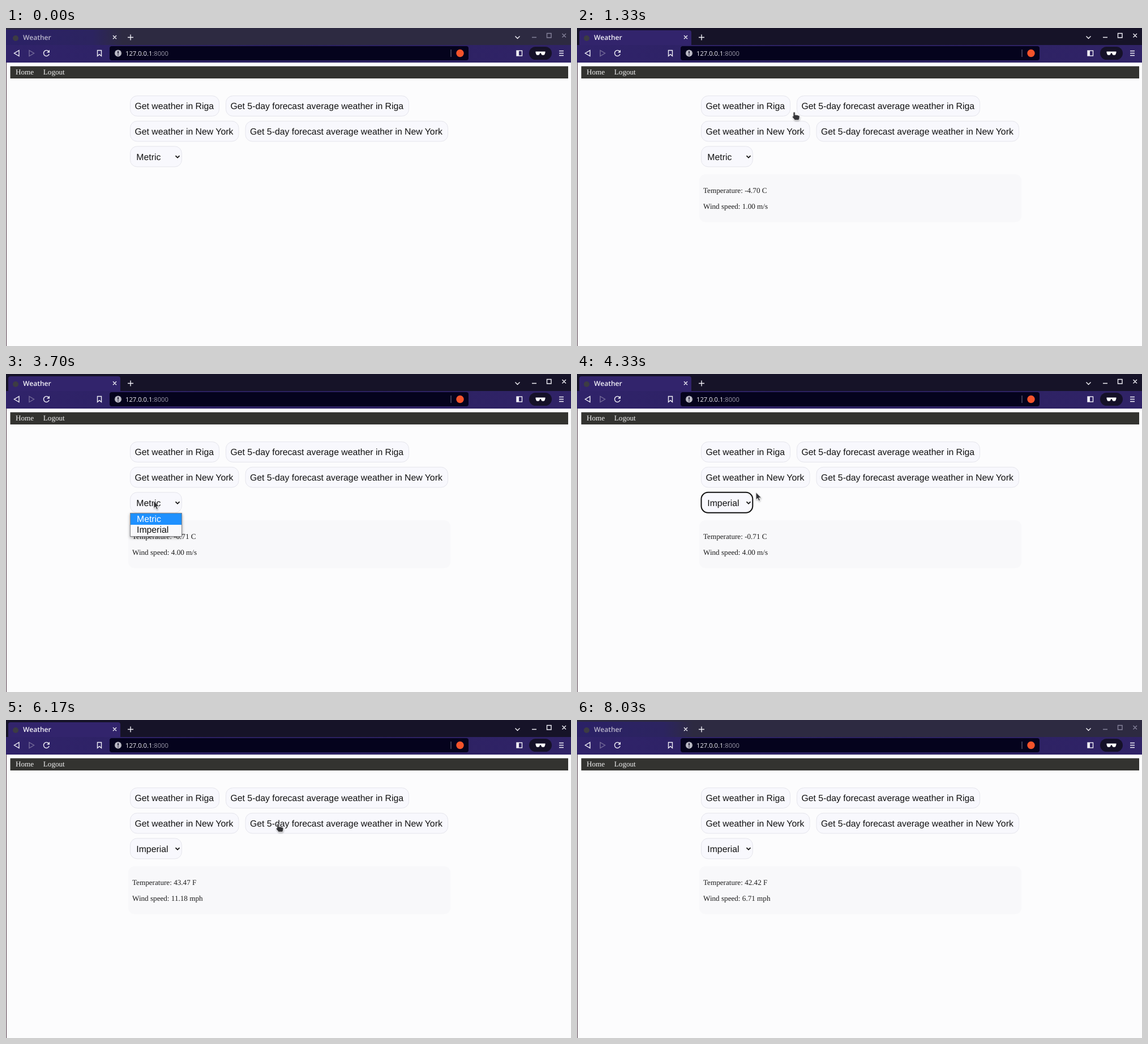
These frames come from a looping animation (998 by 561 pixels, 8.06 s). An HTML page:

```html
<!DOCTYPE html>
<html lang="en">
<head>
<meta charset="utf-8">
<title>Weather</title>
<style>
html, body { margin: 0; width: 100%; height: 100%; overflow: hidden; background: #fcfcfd; }
svg { display: block; width: 998px; height: 561px; }
text { text-rendering: geometricPrecision; white-space: pre; }
.ui { font: 15.8px "Liberation Sans", Arial, sans-serif; fill: #111; }
.page { font: 13.15px "Liberation Serif", "Times New Roman", serif; fill: #1c1c1c; }
.nav { fill: #f2f2f2; }
.tab { font: 600 12.1px "Open Sans", "Noto Sans", sans-serif; }
.url { font: 11.2px "Open Sans", "Noto Sans", sans-serif; fill: #f1f0f6; }
.box { fill: #f8f8fd; stroke: #e5e5ec; }
.line { fill: none; stroke: #f0eff6; stroke-width: 1.4; }
</style>
</head>
<body>
<svg viewBox="0 0 998 561">
  <defs>
    <linearGradient id="idleTab">
      <stop offset="0" stop-color="#2b2166"/><stop offset=".75" stop-color="#2c2460"/><stop offset="1" stop-color="#2d2a42"/>
    </linearGradient>
    <linearGradient id="bar">
      <stop offset="0" stop-color="#30236a"/><stop offset=".5" stop-color="#2b2160"/><stop offset="1" stop-color="#302367"/>
    </linearGradient>
    <filter id="shade" x="-20%" y="-20%" width="140%" height="160%">
      <feDropShadow dx="0" dy="2" stdDeviation="2.5" flood-opacity=".35"/>
    </filter>
    <filter id="soft" x="-50%" y="-50%" width="200%" height="200%">
      <feDropShadow dx="0.5" dy="1.5" stdDeviation="1" flood-opacity=".3"/>
    </filter>
  </defs>

  <rect width="998" height="561" fill="#fcfcfd"/>
  <rect y="61" width="1" height="500" fill="#513b48"/>

  <!-- tab strip, window without focus -->
  <rect width="998" height="31" fill="#2d2a41"/>
  <rect y="3" width="204" height="28" fill="url(#idleTab)"/>
  <text class="tab" x="30" y="20.5" fill="#bab6cb">Weather</text>
  <g class="line" style="stroke:#85829a">
    <path d="M929 16.5h8M955.5 9.500h7.500v7.500h-7.500zM982.500 10l6.500 6.500m0-6.500l-6.500 6.500"/>
  </g>

  <!-- tab strip, window with focus -->
  <g id="active">
    <rect width="998" height="31" fill="#161328"/>
    <path d="M4 31V8q0-4 4-4H198q4 0 4 4V31z" fill="#32246c"/>
    <text class="tab" x="30" y="20.5" fill="#f3f2f8">Weather</text>
    <path class="line" d="M929 16.500h8M955.500 9.500h7.500v7.500h-7.500zM982.500 10l6.500 6.500m0-6.500l-6.500 6.500"/>
  </g>
  <circle cx="17" cy="18" r="5" fill="#3d3c43"/>
  <path class="line" d="M189 13.300l6 6m0-6l-6 6M215 16.500h10M220 11.500v10M899.500 14.500l4 4 4-4"/>

  <!-- toolbar -->
  <rect y="30" width="998" height="31" fill="url(#bar)"/>
  <path class="line" d="M23 39.500v10l-8.500-5z"/>
  <path class="line" d="M41 39.500v10l8.500-5z" style="stroke:#746b98"/>
  <path class="line" d="M75.300 41.200A5 5 0 1 0 76.200 46"/>
  <path d="M77 38.500v5h-5z" fill="#f0eff6"/>
  <path class="line" d="M161.500 39.500h7v10l-3.500-3-3.500 3z"/>
  <rect x="183" y="32" width="634" height="25" rx="4" fill="#05031d"/>
  <circle cx="198" cy="44.500" r="6" fill="#b9b8c4"/>
  <path d="M198 40.800v4.500M198 46.700v1.600" stroke="#05031d" stroke-width="1.600"/>
  <text class="url" x="211" y="48.500">127.0.0.1<tspan fill="#9896a6">:8000</tspan></text>
  <path d="M786 38v13" stroke="#77748c"/>
  <circle cx="802" cy="44.500" r="6.700" fill="#f4532b"/>
  <rect class="line" x="902" y="40" width="9.500" height="9"/>
  <rect x="902" y="40" width="4" height="9" fill="#f0eff6"/>
  <rect x="924" y="33" width="40" height="23" rx="11.500" fill="#151128"/>
  <path d="M935.500 41.500h17v2l-1.200 3.200q-.5 1-1.600 1h-2.200q-1.100 0-1.600-1l-1-2.500h-1.800l-1 2.500q-.5 1-1.600 1h-2.200q-1.100 0-1.600-1l-1.200-3.200z" fill="#fff"/>
  <path class="line" d="M977 40.500h8M977 44.500h8M977 48.500h8"/>

  <!-- page -->
  <rect x="7.500" y="67.500" width="985.500" height="21.500" fill="#333330"/>
  <text class="page nav" x="17" y="82.400">Home</text>
  <text class="page nav" x="65.800" y="82.400">Logout</text>
  <g id="buttons"></g>
  <g id="panel">
    <rect x="216" y="258" width="569" height="84.500" rx="11" fill="#f8f8fa"/>
    <text class="page" id="temp" x="223" y="290.600"></text>
    <text class="page" id="wind" x="223" y="318.800"></text>
  </g>
  <rect class="box" id="select" x="219.500" y="208.800" width="90.800" height="36" rx="12"/>
  <text class="ui" id="unit" x="230.300" y="232.500"></text>
  <path d="M299.500 225.300l3.500 3.500 3.500-3.500" fill="none" stroke="#111" stroke-width="1.800"/>
  <g id="menu">
    <rect x="219.500" y="245.500" width="91" height="41" fill="#f8f8fb" stroke="#85858a" filter="url(#shade)"/>
    <rect id="mark" x="220" width="90" height="20" fill="#1e90ff"/>
    <text class="ui" x="231" y="260.500">Metric</text>
    <text class="ui" x="231" y="280.300">Imperial</text>
  </g>

  <g id="cursor" filter="url(#soft)" fill="#343438" stroke="#f4f4f4" stroke-width=".8" stroke-linejoin="round">
    <path id="arrow" d="M0 0V13l3-2.700 2 4.700 2.300-1-2-4.500h4.200z"/>
    <path id="hand" d="M-1.700 1.300Q0-1 1.500 1.300V5.500Q3 4.300 4.200 5.700 5.700 4.700 6.800 6.300 8.500 5.700 9.400 7.300L9.300 11 8 14.500H1L-3.500 9Q-4 7.300-1.700 7.800z"/>
  </g>
</svg>

<script>
const LOOP = 8060;
const $ = id => document.getElementById(id);
const [active, panel, temp, wind, select, unit, menu, mark, cursor, arrow, hand] =
  ['active', 'panel', 'temp', 'wind', 'select', 'unit', 'menu', 'mark', 'cursor', 'arrow', 'hand'].map($);
const options = menu.querySelectorAll('text');

// x, top, width, label
const buttons = [
  [219.5, 119.700, 157, 'Get weather in Riga'],
  [388.5, 119.700, 323, 'Get 5-day forecast average weather in Riga'],
  [219.5, 164.300, 191.500, 'Get weather in New York'],
  [423, 164.300, 357.500, 'Get 5-day forecast average weather in New York'],
];
$('buttons').innerHTML = buttons.map(([x, y, w, label]) =>
  `<rect class="box" x="${x}" y="${y}" width="${w}" height="35.700" rx="12"/>
   <text class="ui" x="${x + 8}" y="${y + 23.200}">${label}</text>`).join('');

// start time, temperature, wind speed
const readings = [
  [1230, '-4.70 C', '1.00 m/s'],
  [2830, '-0.71 C', '4.00 m/s'],
  [4830, '43.47 F', '11.18 mph'],
  [6200, '42.42 F', '6.71 mph'],
];

// time, x, y of the pointer tip
const path = [
  [60, 835, 338], [400, 600, 235], [830, 372, 170], [1070, 345, 143],
  [1230, 345, 143], [1330, 383.5, 148], [1600, 445, 146], [1870, 469.5, 141],
  [2530, 469.5, 141], [2600, 470, 142], [2670, 469.5, 141], [2830, 469.5, 141],
  [3200, 390, 165], [3630, 261, 224], [3750, 261, 224], [3950, 258, 267],
  [4070, 259, 268], [4330, 316, 209], [4470, 330, 190], [4630, 336, 176],
  [4830, 336, 176], [5630, 476, 180], [5730, 480.5, 183], [6630, 480.5, 183],
  [6680, 481, 184], [6730, 480.5, 183], [6900, 480.5, 183], [7100, 826, 299],
];

const ramp = (t, a, b) => Math.min(1, Math.max(0, (t - a) / (b - a)));
const within = (v, a, b) => v >= a && v < b;
const show = (el, on) => { el.style.display = on ? '' : 'none'; };
const put = (el, text) => { if (el.textContent !== text) el.textContent = text; };

function drawPointer(t) {
  const i = path.findIndex(([time]) => time > t);
  show(cursor, i > 0);
  if (i < 1) return;
  const [t0, x0, y0] = path[i - 1], [t1, x1, y1] = path[i];
  const k = ramp(t, t0, t1);
  const x = x0 + (x1 - x0) * k, y = y0 + (y1 - y0) * k;
  const over = within(x, 219, 781) && within(y, 119, 201);
  cursor.setAttribute('transform', `translate(${x} ${y})`);
  show(hand, over);
  show(arrow, !over);
}

function drawSelect(t) {
  const ring = within(t, 4070, 4600);
  put(unit, t < 4070 ? 'Metric' : 'Imperial');
  select.style.stroke = ring ? '#111' : '';
  select.style.strokeWidth = ring ? 2 : 1;
  show(menu, within(t, 3670, 4070));
  const row = t < 3880 ? 0 : 1;
  mark.setAttribute('y', row ? 266 : 246);
  options.forEach((o, i) => { o.style.fill = i === row ? '#fff' : '#111'; });
}

function draw(t) {
  active.style.opacity = ramp(t, 800, 1000) - ramp(t, 7890, 8020);
  const now = readings.filter(([start]) => start <= t).pop();
  show(panel, now);
  if (now) {
    put(temp, 'Temperature: ' + now[1]);
    put(wind, 'Wind speed: ' + now[2]);
  }
  drawSelect(t);
  drawPointer(t);
}

const begin = performance.now();
function tick() {
  draw((performance.now() - begin) % LOOP);
  requestAnimationFrame(tick);
}
tick();
</script>
</body>
</html>
```
